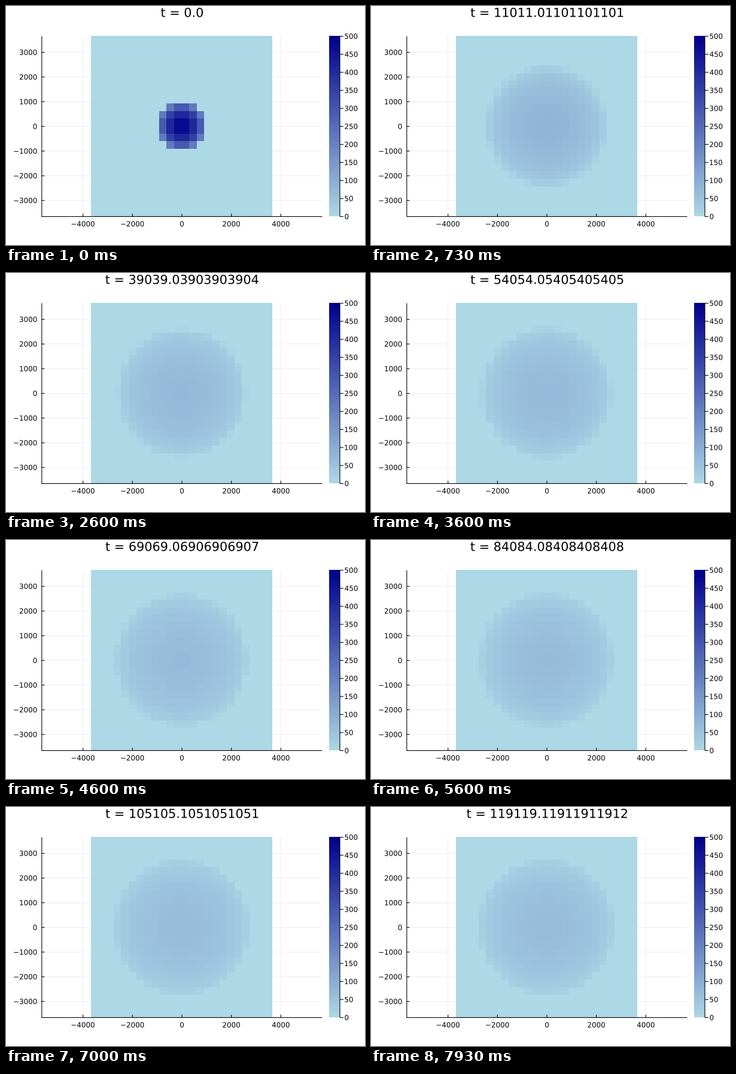
A matplotlib script for the animation above (8 s loop, 600x400 px).

```python
import numpy as np
import matplotlib.pyplot as plt
from matplotlib.animation import FuncAnimation
from matplotlib.colors import LinearSegmentedColormap
from matplotlib.patches import PathPatch
from matplotlib.path import Path
from matplotlib.textpath import TextPath

plt.rcParams["font.family"] = "DejaVu Sans"

W, H, DPI = 600, 400, 100
PX = 72 / DPI                      # points per pixel
LOOP, TICK = 8000, 20              # ms
STEPS = 120                        # model states per loop

# Halfar dome: a circular ice cap spreading under its own weight
H0, R0 = 500, 1000
GAMMA = 0.4 * 1e-16 * (910 * 9.81) ** 3
T0 = (7 / 4) ** 3 * R0 ** 4 / (18 * GAMMA * H0 ** 7)

N, HALF = 24, 3500
grid = np.linspace(-HALF, HALF, N)
radius = np.hypot(*np.meshgrid(grid, grid))
EDGE = HALF * N / (N - 1)

# Plot layout in pixels, y downwards
LEFT, RIGHT, TOP, BOTTOM = 59.8, 528.4, 50.6, 352.4
CX, CY = 294, (TOP + BOTTOM) / 2
SCALE = (BOTTOM - TOP) / (2 * EDGE)
BAR_L, BAR_R = 540.3, 558
ALIGN = {"left": 0, "center": 0.5, "right": 1}

cmap = LinearSegmentedColormap.from_list("ice", ["lightblue", "darkblue"])


def thickness(t):
    s = (1 + t / T0) ** (1 / 18)
    shape = np.clip(1 - (radius / (R0 * s)) ** (4 / 3), 0, None)
    return H0 / s ** 2 * shape ** (3 / 7)


fig = plt.figure(figsize=(W / DPI, H / DPI), dpi=DPI, facecolor="white")
ax = fig.add_axes([0, 0, 1, 1])
ax.axis("off")


def line(x0, y0, x1, y1, width=1.1, color="black", z=3):
    ax.plot([x0, x1], [y0, y1], color=color, lw=width * PX, zorder=z,
            solid_capstyle="butt", snap=False)


def lettering(x, base, text, size, ha):
    """Outline of a text with its baseline at the given pixel height."""
    path = TextPath((0, 0), text, size=size)
    box = path.get_extents()
    shift = x - box.x0 - box.width * ALIGN[ha]
    return Path(path.vertices * [1, -1] + [shift, base], path.codes)


def write(path):
    return ax.add_patch(PathPatch(path, fc="black", lw=0, zorder=4,
                                  snap=False))


def label(x, y, value, ha):
    text = str(value).replace("-", "\u2212")
    write(lettering(x, y + 4.3, text, 11.9, ha))


def heading(t):
    return lettering(CX, 18.3, f"t = {t}", 20.8, "center")


def image(data, box, **kw):
    return ax.imshow(data, extent=box, cmap=cmap, aspect="auto",
                     interpolation="nearest", zorder=2, **kw)


for v in range(-4000, 4001, 2000):
    x = CX + v * SCALE
    line(x, TOP, x, BOTTOM, 0.7, "#e6e6e6", 1)
    line(x, BOTTOM, x, BOTTOM - 4.7)
    label(x, 364.6, v, "center")

for v in range(-3000, 3001, 1000):
    y = CY - v * SCALE
    line(LEFT, y, RIGHT, y, 0.7, "#e6e6e6", 1)
    line(LEFT, y, LEFT + 4.7, y)
    label(51.5, y, v, "right")

line(LEFT, TOP, LEFT, BOTTOM + 0.5)
line(LEFT, BOTTOM, RIGHT, BOTTOM)

field = image(thickness(0), (142.3, 445, BOTTOM, TOP), vmin=0, vmax=H0)
image(np.linspace(1, 0, 256)[:, None], (BAR_L, BAR_R, BOTTOM, TOP))

line(BAR_R, TOP, BAR_R, BOTTOM)
for v in range(0, 501, 50):
    y = BOTTOM - (BOTTOM - TOP) * v / 500
    line(BAR_R, y, BAR_R + 6, y)
    label(566.3, y, v, "left")

title = write(heading(0.0))
ax.set_xlim(0, W)
ax.set_ylim(H, 0)


def draw(i):
    # the small lead lets a step that falls between two ticks start on time
    k = int((i * TICK + 15) * STEPS / LOOP)
    t = k * 1e6 / 999
    field.set_data(thickness(t))
    title.set_path(heading(t))
    return field, title


anim = FuncAnimation(fig, draw, frames=LOOP // TICK, interval=TICK,
                     repeat=True, repeat_delay=0)
plt.show()
```
